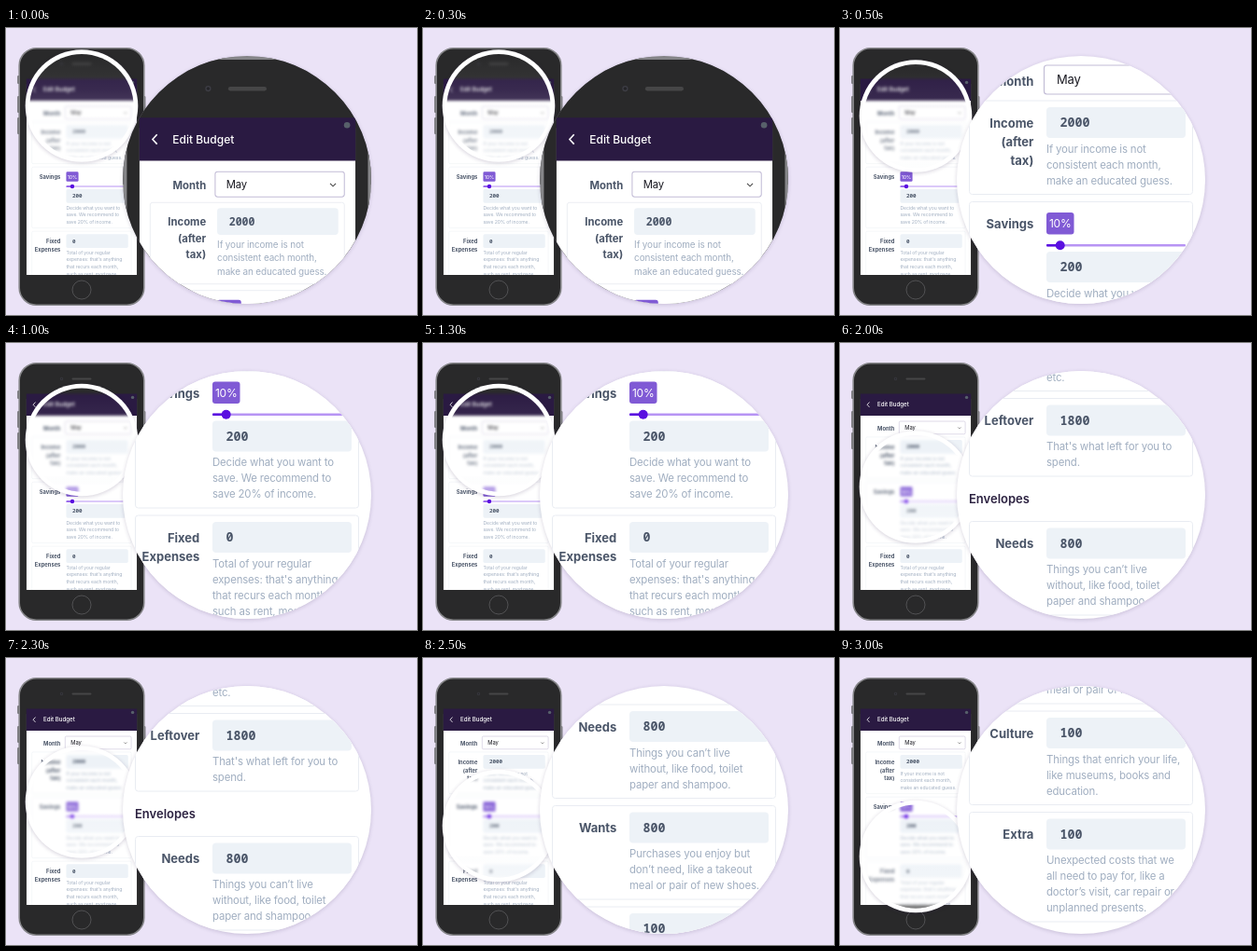
Write an HTML page with a canvas that moves like this. It is 440 by 308 pixels and loops after 3500 ms.

```html
<!DOCTYPE html>
<html lang="en">
<head>
<meta charset="utf-8">
<title>Budget form under a magnifier</title>
<style>
  html, body { margin: 0; width: 100%; height: 100%; overflow: hidden; background: #ebe3f7; }
  canvas { display: block; width: 440px; height: 308px; }
</style>
</head>
<body>
<canvas id="stage" width="440" height="308"></canvas>
<script>
const W = 440, H = 308, STEP = 500;
const SANS = 'Inter, sans-serif', MONO = '"Noto Sans Mono", monospace';
const INK = '#4a5568', MUTED = '#a0aec0', FIELD = '#edf2f7', PURPLE = '#805ad5';
const BODY = '#29292a', EDGE = '#858588';

// Page units are lens pixels; the phone shows the page at PAGE_SCALE.
const PAGE_SCALE = 0.445, PAGE_X = -33.9, PAGE_Y = 66.2;
const LENS = { x: 258, y: 163, r: 133 };
const SPOT = { x: 81, r: 60.3, ring: 4.8 };

// Each step: centre of the small spot on the phone, and page scroll in the lens.
const steps = [
  { spot: 83.5, scroll: null },
  { spot: 94.5, scroll: 0 },
  { spot: 104, scroll: 156.5 },
  { spot: 113.5, scroll: 295.5 },
  { spot: 154.5, scroll: 509.5 },
  { spot: 180, scroll: 651 },
  { spot: 213, scroll: 861 }
];

const rows = [
  { label: ['Income', '(after', 'tax)'], value: '2000',
    note: ['If your income is not', 'consistent each month,', 'make an educated guess.'] },
  { label: ['Savings'], value: '200', slider: true,
    note: ['Decide what you want to', 'save. We recommend to', 'save 20% of income.'] },
  { label: ['Fixed', 'Expenses'], value: '0',
    note: ['Total of your regular', "expenses: that's anything", 'that recurs each month,',
      'such as rent, mortgage,', 'utility bills, season tickets,', 'credit card payments,',
      'phone, parking permit, gym', 'membership, home, car,', 'health, insurance, loans,', 'etc.'] },
  { label: ['Leftover'], value: '1800', note: ["That's what left for you to", 'spend.'] },
  { heading: 'Envelopes' },
  { label: ['Needs'], value: '800',
    note: ['Things you can’t live', 'without, like food, toilet', 'paper and shampoo.'] },
  { label: ['Wants'], value: '800',
    note: ['Purchases you enjoy but', 'don’t need, like a takeout', 'meal or pair of new shoes.'] },
  { label: ['Culture'], value: '100',
    note: ['Things that enrich your life,', 'like museums, books and', 'education.'] },
  { label: ['Extra'], value: '100',
    note: ['Unexpected costs that we', 'all need to pay for, like a', 'doctor’s visit, car repair or',
      'unplanned presents.'] }
];

function text(c, str, x, midY, size, color, { weight = 400, family = SANS, align = 'left', track = 0 } = {}) {
  c.font = `${weight} ${size}px ${family}`;
  c.letterSpacing = track + 'px';
  c.textAlign = align;
  c.fillStyle = color;
  c.fillText(str, x, midY + size * 0.36);
}

function box(c, x, y, w, h, r, fill, stroke, line = 1) {
  c.beginPath();
  c.roundRect(x, y, w, h, r);
  if (fill) { c.fillStyle = fill; c.fill(); }
  if (stroke) { c.strokeStyle = stroke; c.lineWidth = line; c.stroke(); }
}

function disc(c, x, y, r, fill) {
  c.beginPath();
  c.arc(x, y, r, 0, Math.PI * 2);
  c.fillStyle = fill;
  c.fill();
}

function polyline(c, points, color, width) {
  c.beginPath();
  points.forEach(([x, y]) => c.lineTo(x, y));
  c.strokeStyle = color;
  c.lineWidth = width;
  c.stroke();
}

function label(c, str, y) {
  text(c, str, 207.3, y + 0.5, 13, INK, { weight: 700, align: 'right' });
}

function slider(c, top) {
  box(c, 221, top + 11.5, 29.5, 23.5, 3, PURPLE);
  text(c, '10%', 235.7, top + 23.5, 12, '#fff', { align: 'center', track: -0.2 });
  box(c, 221, top + 45.5, 149, 2.6, 1, '#b794f4');
  box(c, 221, top + 45.5, 15, 2.6, 1, '#5a0fe0');
  disc(c, 235.7, top + 46.8, 5, '#5a0fe0');
}

// Draws one card and returns the top of the next one.
function card(c, row, top) {
  const first = top + 23.5;
  const fieldY = row.slider ? top + 70 : first;
  const noteY = fieldY + 28;
  const bottom = noteY + (row.note.length - 1) * 17 + 15;
  box(c, 138.5, top, 239, bottom - top, 3, '#fff', '#e9ecf2');
  row.label.forEach((s, i) => label(c, s, first + i * 20));
  if (row.slider) slider(c, top);
  box(c, 221, fieldY - 16.5, 149, 33, 4, FIELD);
  text(c, row.value, 235.5, fieldY, 13.3, INK, { family: MONO, weight: 600 });
  row.note.forEach((s, i) => text(c, s, 221, noteY + i * 17, 11.4, MUTED, { track: -0.14 }));
  return bottom + 8;
}

function page(c) {
  label(c, 'Month', 56.5);
  box(c, 218.5, 40, 159, 31, 3, '#fff', '#c2bcd6', 1.2);
  text(c, 'May', 232, 55.5, 13, '#1a1a22', { track: -0.2 });
  polyline(c, [[360, 54.5], [363.5, 58], [367, 54.5]], '#444', 1.2);
  let top = 78;
  for (const row of rows) {
    if (row.heading) {
      text(c, row.heading, 138, top + 16.5, 13, '#2b2140', { weight: 600 });
      top += 40.5;
    } else {
      top = card(c, row, top);
    }
  }
}

function header(c) {
  c.fillStyle = '#2a1a42';
  c.fillRect(120, -30, 280, 56.5);
  polyline(c, [[147, -6], [141.5, 0], [147, 6]], '#fff', 1.8);
  text(c, 'Edit Budget', 166, 0, 13.8, '#fff', { weight: 500 });
  disc(c, 380.8, -17.5, 3.8, '#57606a');
}

function phone(c) {
  for (const [x, y, h] of [[12.2, 51, 9], [12.2, 73, 18], [12.2, 96, 18], [147, 73, 18]])
    box(c, x, y, 2.4, h, 1, '#6d6d70');
  box(c, 14.2, 21.7, 133.6, 275.6, 18.5, BODY, EDGE, 1.6);
  box(c, 70.5, 37.4, 21, 2.2, 1.1, '#464647');
  disc(c, 59.5, 38.4, 1.6, '#3d3d44');
  disc(c, 59.5, 38.4, 0.9, '#242428');
  c.beginPath();
  c.arc(81, 281, 10, 0, Math.PI * 2);
  c.strokeStyle = '#515153';
  c.lineWidth = 1;
  c.stroke();

  c.save();
  c.beginPath();
  c.rect(21.8, 54.4, 118.4, 210.6);
  c.clip();
  c.fillStyle = '#fff';
  c.fillRect(21.8, 60, 118.4, 205);
  c.translate(PAGE_X, PAGE_Y);
  c.scale(PAGE_SCALE, PAGE_SCALE);
  page(c);
  header(c);
  c.restore();
}

function shadowDisc(c, x, y, r, fill, alpha, blur) {
  c.save();
  c.shadowColor = `rgba(40, 20, 70, ${alpha})`;
  c.shadowBlur = blur;
  c.shadowOffsetY = 1;
  disc(c, x, y, r, fill);
  c.restore();
}

function clipDisc(c, x, y, r) {
  c.beginPath();
  c.arc(x, y, r, 0, Math.PI * 2);
  c.clip();
}

function spot(c, y) {
  const r = SPOT.r - SPOT.ring;
  shadowDisc(c, SPOT.x, y, SPOT.r, '#fff', 0.2, 4);
  c.save();
  clipDisc(c, SPOT.x, y, r);
  c.filter = 'blur(1.5px)';
  c.drawImage(phoneLayer, 0, 0);
  c.filter = 'none';
  const haze = c.createLinearGradient(0, y - r, 0, y + r);
  haze.addColorStop(0, 'rgba(255,255,255,0)');
  haze.addColorStop(0.35, 'rgba(255,255,255,0.07)');
  haze.addColorStop(1, 'rgba(255,255,255,0.4)');
  c.fillStyle = haze;
  c.fillRect(SPOT.x - r, y - r, r * 2, r * 2);
  c.restore();
}

function lens(c, scroll) {
  const { x, y, r } = LENS;
  const showsPhone = scroll === null;
  shadowDisc(c, x, y, r, showsPhone ? EDGE : '#fff', 0.18, 4);
  c.save();
  clipDisc(c, x, y, r);
  if (showsPhone) {
    c.translate(100.1, -10);
    c.scale(1.955, 1.955);
    phone(c);
  } else {
    c.translate(0, -scroll);
    page(c);
  }
  c.restore();
}

const ctx = document.getElementById('stage').getContext('2d');
const phoneLayer = document.createElement('canvas');
phoneLayer.width = W;
phoneLayer.height = H;
phone(phoneLayer.getContext('2d'));

function draw({ spot: spotY, scroll }) {
  ctx.fillStyle = '#ebe3f7';
  ctx.fillRect(0, 0, W, H);
  ctx.drawImage(phoneLayer, 0, 0);
  spot(ctx, spotY);
  lens(ctx, scroll);
}

const start = performance.now();
let shown = -1;
function tick() {
  const index = Math.floor((performance.now() - start) / STEP) % steps.length;
  if (index !== shown) draw(steps[shown = index]);
  requestAnimationFrame(tick);
}
tick();
</script>
</body>
</html>
```
